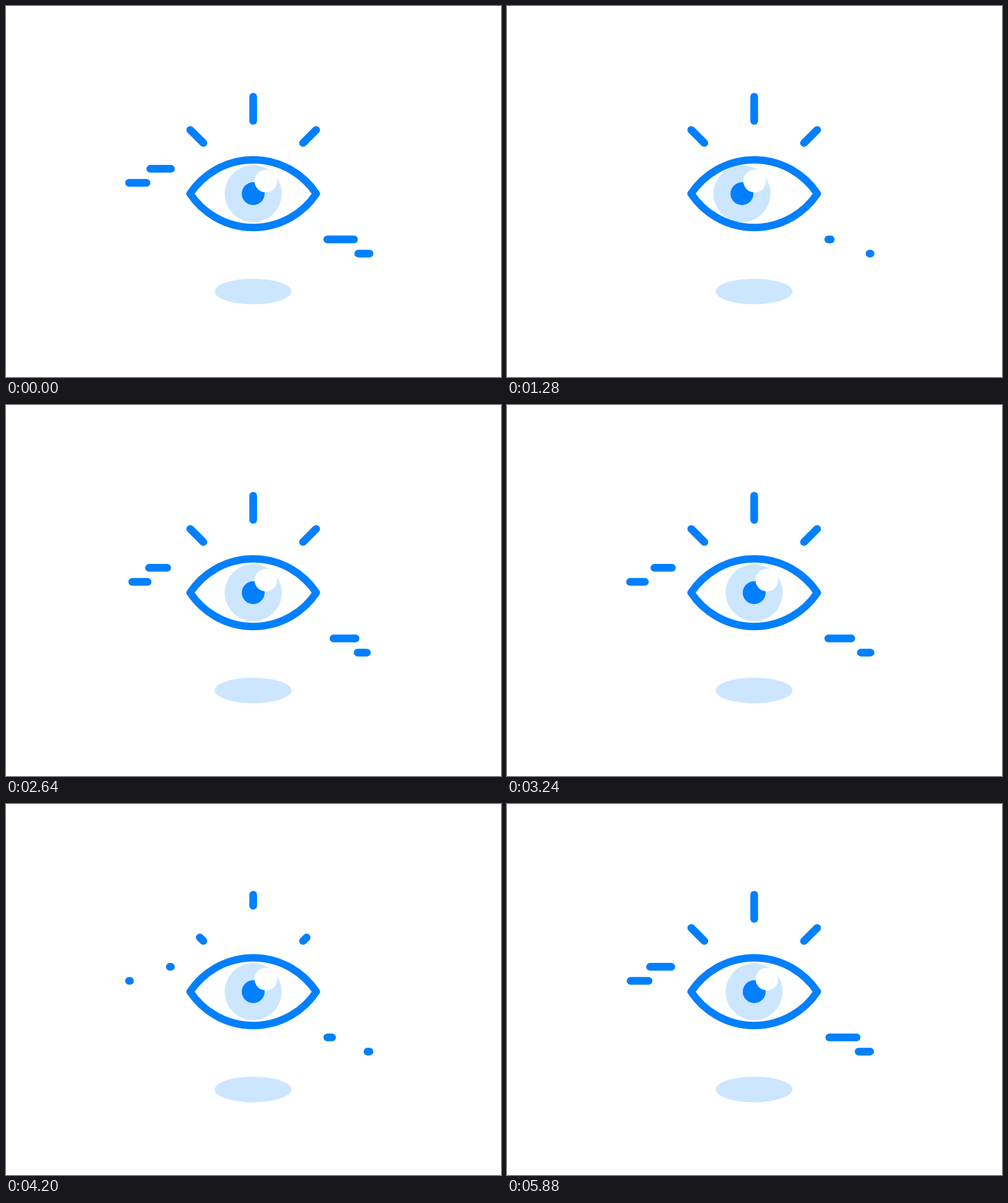
Recreate the animation shown at these times as an HTML page. Size 800 by 600 pixels, loop 5920 ms.

```html
<!DOCTYPE html>
<html lang="en">
<head>
<meta charset="utf-8">
<title>Eye</title>
<style>
  html, body { margin: 0; width: 100%; height: 100%; overflow: hidden; background: #fff; }
  svg { display: block; width: 800px; height: 600px; }
  .line { fill: none; stroke: #007fff; stroke-width: 12.5; stroke-linecap: round; stroke-linejoin: round; }
</style>
</head>
<body>
<svg viewBox="0 0 800 600">
  <ellipse cx="399.3" cy="461.7" rx="62" ry="20.7" fill="#cce6ff"/>
  <g id="iris">
    <circle cx="399.5" cy="303.5" r="46" fill="#cce6ff"/>
    <circle cx="399.5" cy="303.5" r="18.5" fill="#007fff"/>
    <circle cx="420" cy="283.2" r="18.3" fill="#fff"/>
  </g>
  <path class="line" style="stroke-width:12" d="M297.5 303.5A122.4 122.4 0 0 1 501.5 303.5A122.4 122.4 0 0 1 297.5 303.5Z"/>
  <g id="lines"></g>
</svg>
<script>
const LOOP = 5920, STEP = 40;
const CYCLE = 3040, LEAD = 80;
const BURSTS = [20, 3520, 4060], BURST = 220;

// Dashes run from a start point to an end point; each side has its own pace.
const left = {
  erase: [[0, 0], [840, .595], [1300, 1]],
  draw: [[1590, 0], [1840, .18], [2480, .68], [2720, .825], [2920, .97], [2980, 1]]
};
const right = {
  erase: [[0, 0], [840, .56], [1280, .86], [1480, 1]],
  draw: [[1680, 0], [1840, .11], [2440, .62], [2720, .78], [2920, .965], [2970, 1]]
};
const iris = [[1000, 0], [1300, -20], [1600, -20], [2080, 20], [2280, 20], [2600, 0]];

const smooth = u => u * u * (3 - 2 * u);

function sample(keys, t, ease = u => u) {
  if (t <= keys[0][0]) return keys[0][1];
  for (let i = 1; i < keys.length; i++) {
    const [t0, a] = keys[i - 1], [t1, b] = keys[i];
    if (t <= t1) return a + (b - a) * ease((t - t0) / (t1 - t0));
  }
  return keys[keys.length - 1][1];
}

function addLine(x1, y1, x2, y2, extra) {
  const el = document.createElementNS("http://www.w3.org/2000/svg", "line");
  el.setAttribute("class", "line");
  document.getElementById("lines").append(el);
  return { el, x1, y1, x2, y2, ...extra };
}

// Shows the part of a line between the fractions a and b.
function trim(l, a, b) {
  const set = (k, v) => l.el.setAttribute(k, v);
  set("visibility", b - a > .002 ? "visible" : "hidden");
  set("x1", l.x1 + (l.x2 - l.x1) * a);
  set("y1", l.y1 + (l.y2 - l.y1) * a);
  set("x2", l.x1 + (l.x2 - l.x1) * b);
  set("y2", l.y1 + (l.y2 - l.y1) * b);
}

const dashes = [
  addLine(231.2, 263.3, 266.6, 263.3, { pace: left }),
  addLine(228.8, 286.1, 198.8, 286.1, { pace: left }),
  addLine(564.9, 377.5, 519.3, 377.5, { pace: right }),
  addLine(568.3, 400.4, 587.5, 400.4, { pace: right })
];
const rays = [
  addLine(319, 221.6, 297.8, 200.4, { delay: 0 }),
  addLine(399.5, 185.8, 399.5, 146.7, { delay: 80 }),
  addLine(480, 221.6, 501.2, 200.4, { delay: 0 })
];
const irisEl = document.getElementById("iris");

function render(t) {
  const phase = (t + LEAD) % CYCLE;
  for (const d of dashes) {
    const { erase, draw } = d.pace;
    if (phase < draw[0][0]) trim(d, sample(erase, phase), 1);
    else trim(d, 0, sample(draw, phase));
  }
  for (const r of rays) {
    const start = BURSTS.find(b => t >= b + r.delay && t < b + r.delay + BURST);
    const u = start === undefined ? 1 : (t - start - r.delay) / BURST;
    if (u < .5) trim(r, u * 2, 1);
    else trim(r, 0, u * 2 - 1);
  }
  irisEl.setAttribute("transform", `translate(${sample(iris, t, smooth)} 0)`);
}

const begin = performance.now();
function tick() {
  const t = (performance.now() - begin) % LOOP;
  render(Math.floor(t / STEP) * STEP);
  requestAnimationFrame(tick);
}
tick();
</script>
</body>
</html>
```
